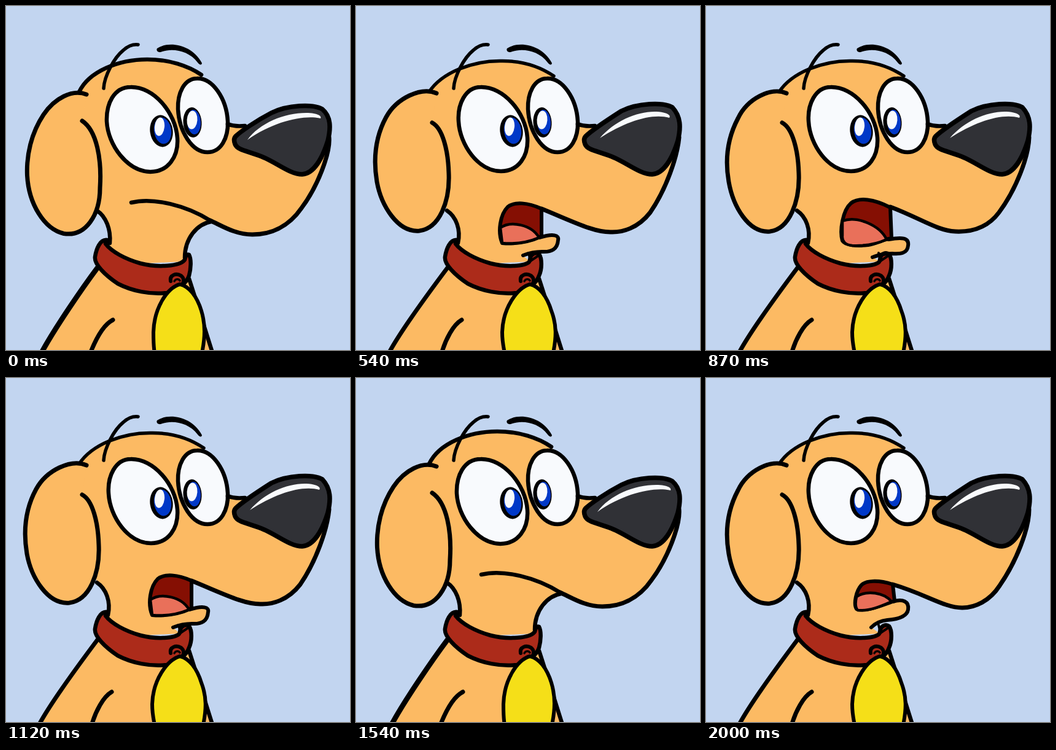
An HTML page for the animation above (2.16 s loop, 560 px wide and 560 px high).

```html
<!DOCTYPE html>
<html lang="en">
<head>
<meta charset="utf-8">
<title>Talking dog</title>
<style>
  html, body { margin: 0; height: 100%; overflow: hidden; background: #c2d5f0; }
  svg { display: block; width: 100%; height: 100%; }
</style>
</head>
<body>
<svg id="stage" viewBox="0 0 560 560" fill="none" stroke="#000" stroke-linecap="round" stroke-linejoin="round"></svg>
<script>
const SKIN = '#fcba63', RED = '#ac2b1a', YELLOW = '#f5df18', WHITE = '#f8fafd',
      BLUE = '#0038c8', NOSE = '#303136', MOUTH = '#850f03', TONGUE = '#e9705a';

const EAR_REST = 'M131 144 C108 135 79 150 61 177 C41 207 33 243 34.5 276 C37 322 62 363 94 370.5 C130 376 153 340 153 296 C156 250 148 203 124 187';
const EAR_OUT = 'M131 142 C106 131 66 150 49 181 C31 214 28 250 34 286 C41 325 68 369 103 366 C136 362 153 318 151 272 C150 235 141 199 124 190';
const EAR_IN = 'M131 142 C106 131 67 151 52 183 C34 217 31 252 37 286 C44 326 69 370 104 367 C136 363 153 318 151 272 C150 235 141 199 124 190';

// muzzle and jaw omit the leading command so they can be stroked or joined into the head fill
const poses = {
  closed: {
    ear: EAR_REST,
    muzzle: '526 214 C528 239 508 293 481 329 C459 361 429 372 401 372 C373 372 352 358 332 349',
    jaw: '334 351 C311 355 291 378 291 410',
    smile: 'M332 349 C294 325 240 311 204 320'
  },
  small: {
    ear: EAR_IN,
    muzzle: '526 214 C526 246 505 299 478 338 C462 363 438 374 417 374 C388 374 358 352 304 336',
    jaw: '304 364 C321 359 331 364 329 377 C327 390 309 393 295 394 C285 395 275 400 269 406',
    mouth: 'M304 336 C279 328 260 330 253 337 C244 347 240 368 245 376 C262 381 286 370 307 363 Z',
    tongue: 'M245 356 C262 345 290 349 302 364 C286 371 266 380 247 378 C243 374 243 365 245 356 Z'
  },
  mid: {
    ear: EAR_OUT,
    muzzle: '526 214 C523 246 505 298 479 336 C459 362 433 369 414 368 C387 368 358 353 302 330',
    jaw: '299 377 C321 370 331 373 329 381 C328 396 318 401 303 400 C290 400 282 402 272 406',
    mouth: 'M302 330 C280 320 258 318 247 327 C235 339 230 367 238 386 C261 388 282 384 302 375 Z',
    tongue: 'M235 361 C252 349 286 356 298 377 C279 385 259 388 238 386 Z'
  },
  wide: {
    ear: EAR_IN,
    muzzle: '526 214 C525 246 505 298 477 336 C457 363 428 368 406 367 C377 366 348 345 300 327',
    jaw: '297 380 C319 376 331 377 329 390 C328 403 316 404 303 403 C289 403 282 405 271 409',
    mouth: 'M300 328 C273 314 249 311 236 321 C223 332 217 365 222 382 C226 390 247 391 264 389 C278 387 288 380 302 378 Z',
    tongue: 'M222 350 C246 341 283 357 294 380 C279 387 262 391 238 390 C227 389 221 383 222 374 Z'
  }
};

// start time in ms, pose
const cues = [
  [0, 'closed'], [120, 'wide'], [290, 'closed'], [410, 'small'], [540, 'mid'],
  [700, 'closed'], [870, 'wide'], [1000, 'small'], [1120, 'mid'], [1250, 'closed'],
  [1410, 'wide'], [1540, 'closed'], [1750, 'small'], [1870, 'mid'], [2000, 'small']
];
const LOOP = 2160;

const path = (d, width = 6.5, fill = 'none') =>
  d ? `<path d="${d}" stroke-width="${width}" fill="${fill}"/>` : '';
const flat = (d, fill) => `<path d="${d}" stroke="none" fill="${fill}"/>`;
const oval = (x, y, rx, ry, turn, fill) =>
  `<ellipse cx="${x}" cy="${y}" rx="${rx}" ry="${ry}" transform="rotate(${turn} ${x} ${y})" fill="${fill}" stroke="none"/>`;

function body(rest) {
  const x = rest ? 0 : -4;
  const side = `M149 426 C125 458 ${79 + x} 525 ${58 + x} 564`;
  const back = 'C322 520 306 468 298 444';
  return flat(`${side} L336 564 ${back} Z`, SKIN)
    + path(side, rest ? 8.5 : 7) + path(`M336 564 ${back}`)
    + path(`M${138 - x / 2} 563 C146 543 158 519 ${174 + x / 2} 511`, 7);
}

function collar(rest) {
  const knob = rest ? 'C301 428 302 412 298 405 C294 403 292 408 291 413'
                    : 'C303 428 303 411 298 404 C293 400 284 403 283 413';
  const w = rest ? 0 : 2;
  return path(`M165 381 C153 379 147 396 145 408 C143 420 161 438 182 452 C205 464 235 470 262 467 C277 464 294 452 298 439 ${knob} C284 424 246 426 219 419 C194 412 172 400 162 387 Z`, 6.5, RED)
    + path(rest ? '' : 'M281 402 L284 415 L296 407', 4)
    + path('M268 448 C266 438 277 434 285 439 C290 443 290 449 287 453', 6, RED)
    + path('M274 448 C276 444 281 444 283 447', 3.5)
    + path(`M283 453 C262 459 ${241 - w} 492 ${240 - w} 531 C${240 - w} 546 240 555 242 565 L${319 + w} 565 C${324 + w} 540 ${325 + w} 519 318 496 C311 473 298 456 283 453 Z`, 6, YELLOW);
}

function eyes(rest) {
  const left = rest
    ? 'M203 132 C175 132 163 160 164 188 C166 226 197 269 235 270 C264 270 281 245 279 215 C276 173 240 131 203 132 Z'
    : 'M203 132 C178 132 165 160 167 188 C169 226 199 269 236 269 C265 269 281 244 279 214 C276 173 240 131 203 132 Z';
  return path(left, 6.5, WHITE)
    + path('M311 118 C290 118 279 142 280 168 C282 205 303 238 328 238 C350 238 362 215 361 188 C359 150 336 117 311 118 Z', 6.5, WHITE)
    + oval(253, 203.5, 18.5, 26, -8, '#000')
    + oval(255, 203, 14, 21.5, -8, BLUE)
    + oval(250, 196.5, 8, 15, 6, WHITE)
    + oval(303.5, 189.5, 15, 24.5, -4, '#000')
    + oval(306, 189, 11, 20, -4, BLUE)
    + oval(303, 185.5, 8.5, 15, 4, WHITE);
}

function nose(rest) {
  const shine = rest
    ? 'M393 218 C413 190 455 173 492 174 C508 175 514 179 512 183 C486 177 437 187 393 218 Z'
    : 'M397 215 C421 187 458 171 489 172 C507 173 513 178 510 182 C483 174 440 187 397 215 Z';
  const top = rest ? 161 : 158;
  return path('M361 192 C369 196 377 196 389 195')
    + path(`M374 212 C381 205 407 187 432 ${top + 13} C458 ${top} 500 ${top - 2} 515 ${top + 7} C529 180 529 198 524 219 C515 248 501 273 482 274 C462 274 441 255 416 245 C394 236 377 235 373 225 C371 220 371 215 374 212 Z`, 7.5, NOSE)
    + flat(shine, WHITE);
}

function brows() {
  return path('M159 134 C160 114 176 84 191 72 C200 64 207 62 215 63', 5.5)
    + flat('M246 69 C263 57 302 61 319 93 C318 97 315 96 312 92 C297 72 270 68 252 75 C247 76 244 72 246 69 Z', '#000');
}

function dog(name) {
  const p = poses[name], rest = name === 'closed';
  const crown = rest ? 'M119 140 C135 106 184 87 230 87 C265 87 296 97 318 112'
                     : 'M119 140 C140 108 190 89 236 89.5 C270 89 300 99 322 114';
  const nape = 'C171 364 163 343 148 333';
  return body(rest)
    + flat(`${crown} L362 192 L389 195 L${p.muzzle} L${p.jaw} L${rest ? 291 : 283} 416 L200 420 L${rest ? 169 : 166} 392 ${nape} L120 186 Z`, SKIN)
    + path(`M${rest ? 169 : 166} 386 ${nape}`)
    + (rest ? path(`M${p.jaw}`) : '')
    + collar(rest)
    + path(crown, rest ? 6.5 : 5.5)
    + (p.mouth ? path(p.mouth, 6, MOUTH) + path(p.tongue, 4.5, TONGUE) : '')
    + path(`M${p.muzzle}`, 7)
    + path(p.smile)
    + (rest ? '' : path(`M${p.jaw}`, 6))
    + path(p.ear, 7, SKIN)
    + eyes(rest) + nose(rest) + brows();
}

const stage = document.getElementById('stage');
let shown;

function draw(now) {
  const t = now % LOOP;
  const name = cues.findLast(([start]) => start <= t)[1];
  if (name !== shown) stage.innerHTML = dog(shown = name);
  requestAnimationFrame(draw);
}
draw(performance.now());
</script>
</body>
</html>
```
